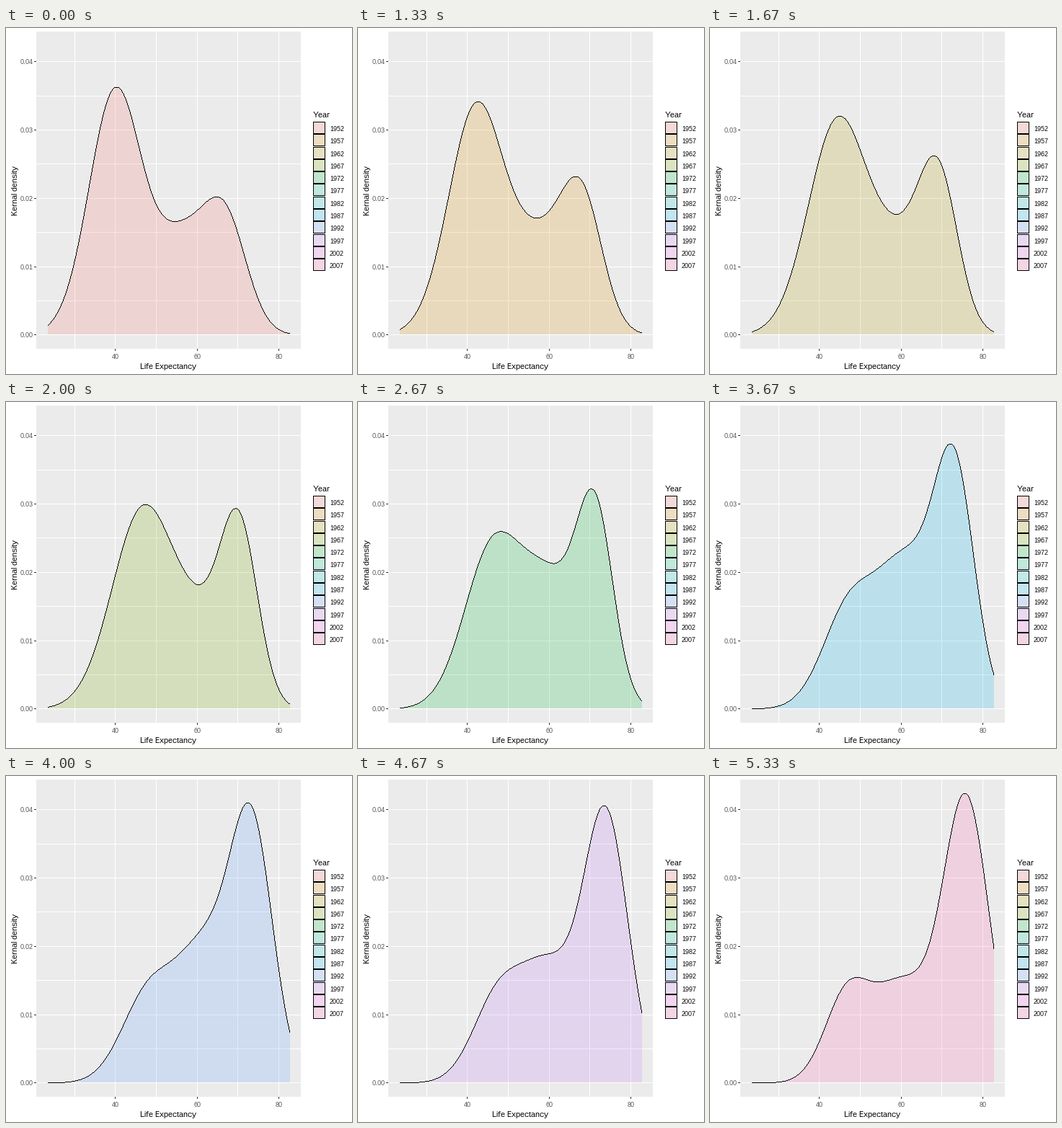
Animation of 480 by 480 pixels, one loop 6.67 s. Source, as a matplotlib script:

```python
import numpy as np
import matplotlib.pyplot as plt
from matplotlib.animation import FuncAnimation
from matplotlib.patches import Polygon, Rectangle

SIZE = 480
FRAMES, INTERVAL = 230, 29
LEFT, TOP, RIGHT, BOTTOM = 42, 5, 409, 445
FLOOR = 425
YEARS = range(1952, 2008, 5)
COLORS = ("#F8766D #DE8C00 #B79F00 #7CAE00 #00BA38 #00C08B "
          "#00BFC4 #00B4F0 #619CFF #C77CFF #F564E3 #FF64B0").split()

# Every curve is a sum of three bell bumps that drift between key years.
# Each bump: centre (age), width (age), height (pixels)
KEY_YEARS = [1952, 1967, 1977, 1992, 1997, 2007]
BUMPS = [
    ([40.1, 46.8, 46.2, 48, 47.6, 46.8],
     [6.5, 7.6, 6.6, 6.5, 6.2, 5.5],
     [340, 276, 178, 118, 117, 119]),
    ([56, 61.3, 59.6, 62.2, 60, 60.3],
     [6, 6.3, 6.6, 7.1, 6.6, 7],
     [120, 94, 215, 182, 150, 134]),
    ([66.7, 70.3, 72.2, 73.5, 73.9, 75.9],
     [5.35, 4.6, 4.4, 5.15, 5.4, 5.6],
     [160, 238, 286, 331, 367, 390]),
]

plt.rcParams["font.family"] = "Liberation Sans"
plt.rcParams["text.hinting"] = "default"
plt.rcParams["text.hinting_factor"] = 1
fig = plt.figure(figsize=(SIZE / 72, SIZE / 72), dpi=72, facecolor="white")
ax = fig.add_axes([0, 0, 1, 1])
ax.set_xlim(0, SIZE)
ax.set_ylim(SIZE, 0)
ax.axis("off")


def age_x(age):
    return 151.3 + (age - 40) * 5.667


def density_y(density):
    return 425.4 - density * 9478


def box(x, y, w, h, color, z=1, alpha=1):
    ax.add_patch(Rectangle((x, y), w, h, fc=color, lw=0, alpha=alpha, zorder=z))


def label(x, y, text, size=9.2, color="black", ha="left", rotation=0):
    ax.text(x, y, text, size=size, color=color, ha=ha, va="baseline",
            rotation=rotation, rotation_mode="anchor")


# Panel, grid lines, ticks and axis text
box(LEFT, TOP, RIGHT - LEFT, BOTTOM - TOP, "#EBEBEB", 0)
for age in range(30, 81, 10):
    box(round(age_x(age)), TOP, 1, BOTTOM - TOP, "white")
for step in range(9):
    box(LEFT, round(density_y(step * 0.005)), RIGHT - LEFT, 1, "white")
for age in (40, 60, 80):
    x = round(age_x(age))
    box(x, BOTTOM, 1, 3, "#333333")
    label(x + 0.5, 459, str(age), color="#4D4D4D", ha="center")
for step in range(5):
    y = round(density_y(step * 0.01))
    box(LEFT - 3, y, 3, 1, "#333333")
    label(37.5, y + 4, f"{step * 0.01:.2f}", color="#4D4D4D", ha="right")
label(225, 473, "Life Expectancy", 11, ha="center")
label(16, 225.5, "Kernal density", 11, ha="center", rotation=90)

# Legend
label(426, 124, "Year", 11)
box(426, 130, 17, 207, "#F2F2F2")
for i, (year, color) in enumerate(zip(YEARS, COLORS)):
    top = round(130 + 17.28 * i)
    box(426, top, 17, 17, "black", 2)
    box(427, top + 1, 15, 15, "#F2F2F2", 3)
    box(427, top + 1, 15, 15, color, 4, 0.2)
    label(449, top + 13, str(year))

# Pixel columns under the curve, and the ages at their edges
EDGES = np.arange(58, 395)
AGES = 40 + (EDGES - 0.5 - 151.3) / 5.667
STEP_X = np.repeat(EDGES, 2)[1:-1]


def curve(year):
    """Rows where the one-pixel outline starts and ends in each column."""
    y = np.full(len(AGES), density_y(0))
    for bump in BUMPS:
        centre, width, height = (np.interp(year, KEY_YEARS, p) for p in bump)
        y -= height * np.exp(-((AGES - centre) / width) ** 2 / 2)
    y = np.round(y)
    upper = np.minimum(y[:-1], y[1:])
    lower = np.maximum(np.maximum(y[:-1], y[1:]), upper + 1)
    return np.repeat(upper, 2), np.repeat(lower, 2)


def band(upper, lower):
    return np.column_stack([np.r_[STEP_X, STEP_X[::-1]],
                            np.r_[upper, lower[::-1]]])


def shape(z, **style):
    return ax.add_patch(Polygon([(0, 0)], lw=0, snap=False, zorder=z, **style))


curves = [curve(year) for year in YEARS]
starts = np.round(2.8 + 1.2 * np.arange(1, len(YEARS))) * 1000 / 3
area = shape(5, alpha=0.2)
outline = shape(6, fc="black")


def draw(n):
    i = int(np.sum((n + 1) * INTERVAL > starts))
    upper, lower = curves[i]
    area.set_xy(band(np.minimum(upper, FLOOR), np.full(len(upper), FLOOR)))
    area.set_facecolor(COLORS[i])
    outline.set_xy(band(upper, lower))
    return area, outline


anim = FuncAnimation(fig, draw, frames=FRAMES, interval=INTERVAL, repeat=True,
                     repeat_delay=0, blit=False)
plt.show()
```
